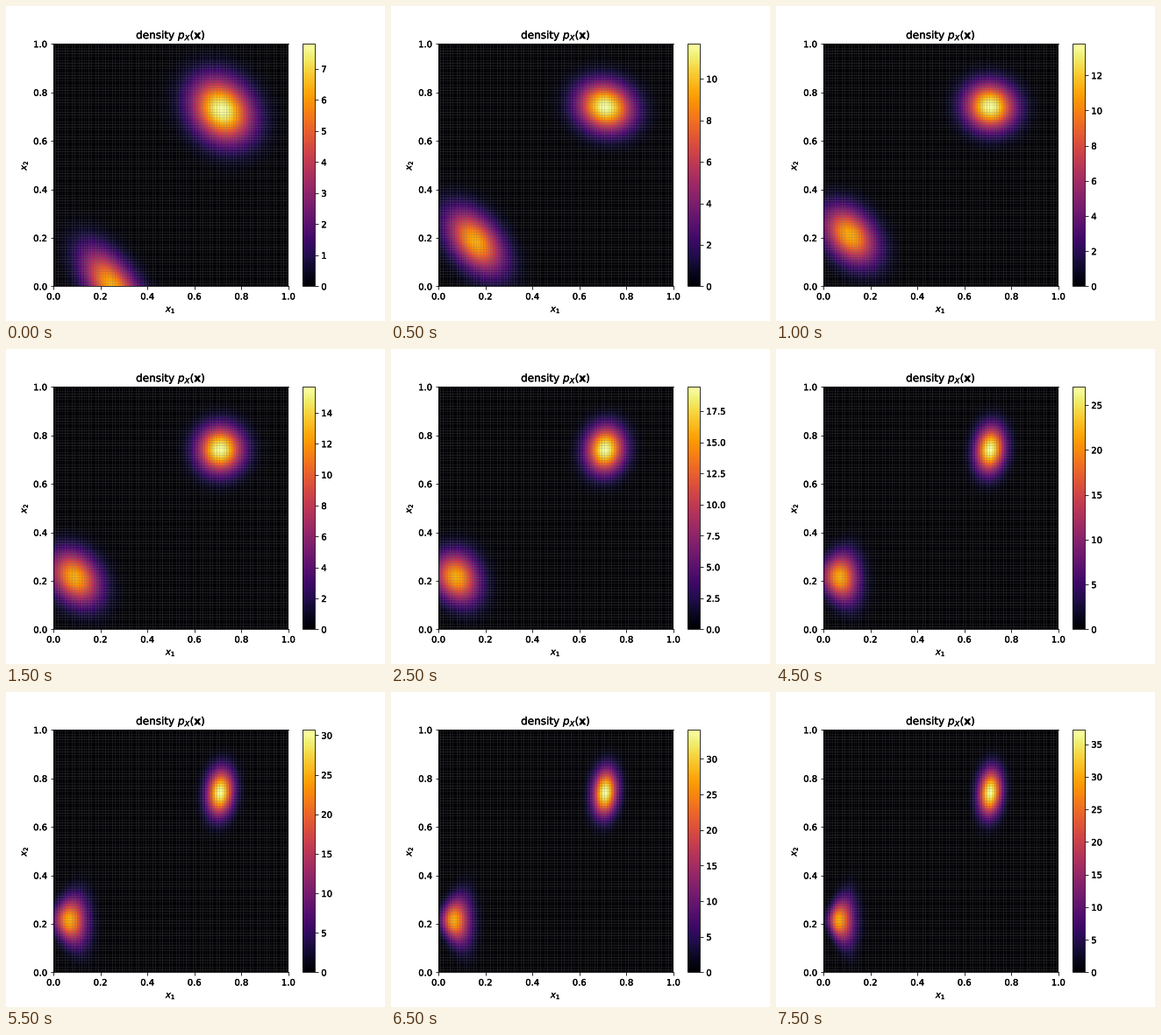
Recreate the animation shown at these times as a matplotlib script. Size 432 by 360 pixels, loop 8000 ms.

```python
import numpy as np
import matplotlib.pyplot as plt
from matplotlib.animation import FuncAnimation
from matplotlib.patheffects import withStroke
from matplotlib.text import Text

W, H, DPI = 432, 360, 72
FRAMES, INTERVAL = 16, 500
CELLS = 99
SPREAD = 1.07

edges = np.linspace(0, 1, CELLS + 1)
mid = (edges[:-1] + edges[1:]) / 2
X, Y = np.meshgrid(mid, mid)


def settle(start, end, step, tau):
    """Exponential approach from start to end."""
    return end + (start - end) * np.exp(-step / tau)


def blob(cx, cy, left, right, sy, rho, flare=0):
    """Tilted Gaussian, wider towards the right when flared."""
    dx = X - cx
    u = dx / (SPREAD * np.where(dx < 0, left, right))
    v = (Y - cy) / (SPREAD * sy * np.clip(1 + flare * dx, .4, 1.5))
    return np.exp(-(u * u - 2 * rho * u * v + v * v) / (2 - 2 * rho * rho))


def density(step):
    t = step / (FRAMES - 1)
    peak = (settle(7.8, 10.2, step, .5) + 1.8 * step
            + .7 * np.sin(np.pi * t * t))
    width = settle(.084, .027, step, 6.2)
    upper = blob(
        cx=settle(.717, .710, step, .5),
        cy=settle(.727, .742, step, .5),
        left=width, right=width,
        sy=settle(.085, .062, step, .5),
        rho=settle(-.2, .12, step, 3),
    )
    lower = blob(
        cx=settle(.25, .078, step, 1.3) - .014 * t,
        cy=settle(0, .215, step, .5),
        left=.082 - .055 * t,
        right=settle(.084, .032, step, 9),
        sy=settle(.1, .068, step, 1.5) - .016 * t * t,
        rho=settle(-.58, 0, step, 4),
        flare=8 * t * t,
    )
    return peak, peak * (upper + .82 * lower)


def add_axes(x, width):
    return fig.add_axes([x / W, .11, width / W, .77])


fig = plt.figure(figsize=(W / DPI, H / DPI), dpi=DPI)
ax = add_axes(54, 267.84)
bar_ax = add_axes(338.4, 13.86)

# Unsnapped cells let a little of the grey backdrop through their seams.
ax.set_facecolor("0.45")
peak, z = density(0)
mesh = ax.pcolor(edges, edges, z, cmap="inferno", vmin=0, vmax=peak,
                 antialiased=True, snap=False)
fig.colorbar(mesh, cax=bar_ax)
ax.set(xlim=(0, 1), ylim=(0, 1), xlabel="$x_1$", ylabel="$x_2$",
       title=r"density $p_X(\mathbf{x})$")
ax.spines.right.set_position(("outward", -.4))

heavier = [withStroke(linewidth=.3, foreground="black")]


def update(step):
    peak, z = density(step)
    mesh.set_array(z)
    mesh.set_clim(0, peak)
    bar_ax.get_yticklabels()  # refresh ticks before styling their text
    for text in fig.findobj(Text):
        text.set_path_effects(heavier)
    return [mesh]


anim = FuncAnimation(fig, update, frames=FRAMES, interval=INTERVAL,
                     repeat=True, repeat_delay=0)
plt.show()
```
